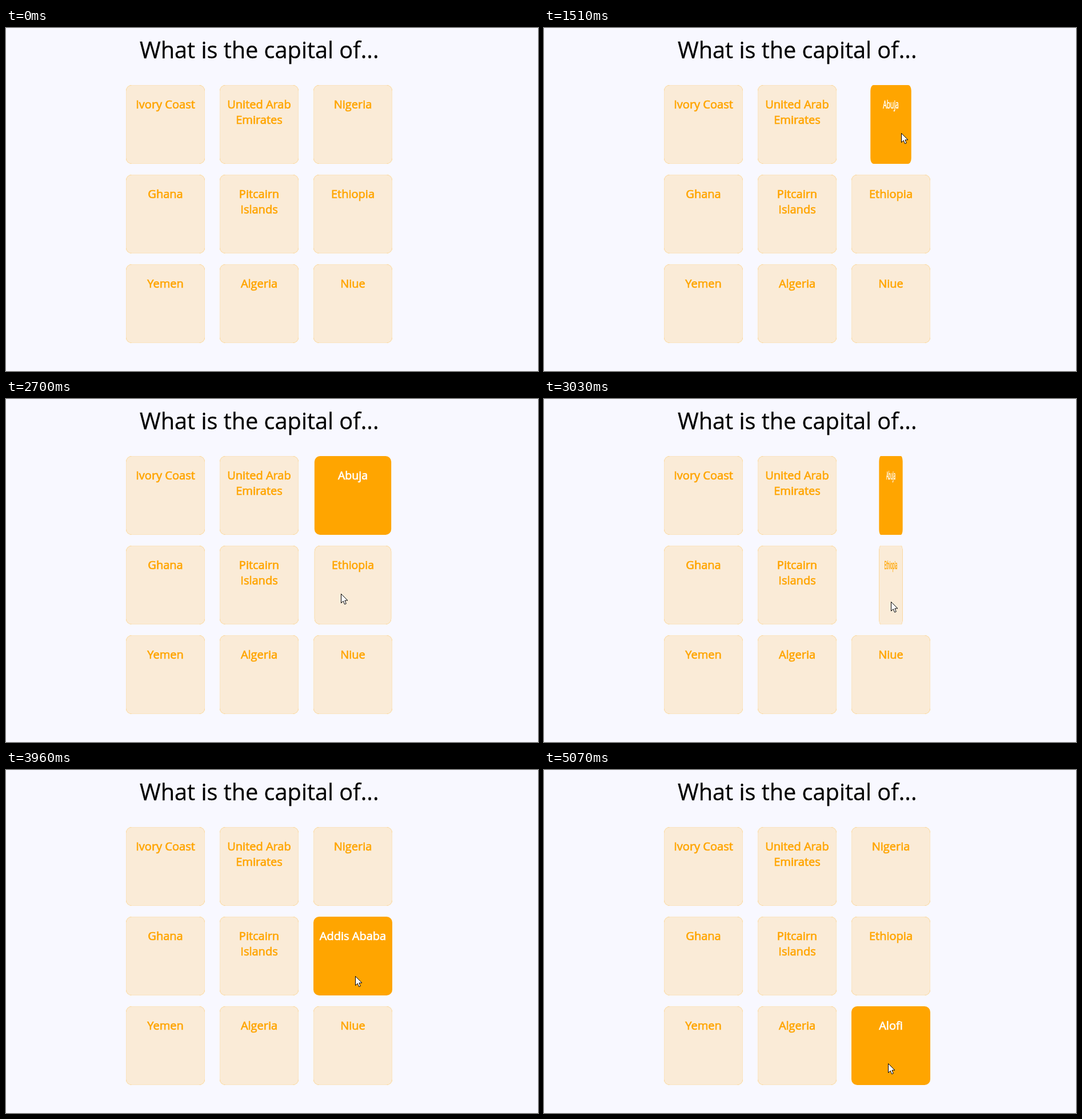
An HTML page for the animation above (5740 ms loop, 931 by 601 pixels).

```html
<!DOCTYPE html>
<html lang="en">
<head>
<meta charset="utf-8">
<title>Capital quiz cards</title>
<style>
  html, body { margin: 0; width: 100%; height: 100%; overflow: hidden; background: #f8f8ff; }
  svg { display: block; }
  text { font-family: "Open Sans", sans-serif; text-anchor: middle; }
  .title { font-size: 39.7px; stroke: #000; stroke-width: .3px; }
  .label { font-size: 20px; stroke-width: .7px; }
  .front .label { fill: #ffa500; stroke: #ffa500; }
  .back .label { fill: #fff; stroke: #fff; }
  .base { fill: #ffa500; }
  .paper { fill: #faebd7; }
  .rim { fill: none; stroke: #ffa500; stroke-opacity: .1; }
</style>
</head>
<body>
<svg id="stage" width="931" height="601" viewBox="0 0 931 601">
  <text class="title" x="443.2" y="52.5">What is the capital of...</text>
  <g id="cards"></g>
  <path id="cursor" d="M.5 .5V16.5L4.2 13 6.6 18.7 9.3 17.6 6.9 12H11.9Z"
        fill="#fff" stroke="#000" stroke-width="1" visibility="hidden"/>
</svg>
<script>
const LOOP = 5740, FIRST = 590, STEP = 65.95, FLIP = 1000;
const SIZE = 138, RADIUS = 10;

// question lines, answer, time turned over, time turned back
const deck = [
  ["Ivory Coast"], ["United Arab|Emirates"], ["Nigeria", "Abuja", 840, 2627],
  ["Ghana"], ["Pitcairn|Islands"], ["Ethiopia", "Addis Ababa", 2627, 4025],
  ["Yemen"], ["Algeria"], ["Niue", "Alofi", 4025, Infinity]
];

// time, x, y of the pointer tip
const path = [
  [590, 870, 161], [656, 811, 162], [722, 703, 165], [788, 642, 176], [854, 625, 184],
  [2371, 625, 184], [2437, 616, 208], [2503, 600, 266], [2569, 589, 318],
  [2634, 586, 341], [2701, 586, 341], [3030, 607, 355], [3162, 610, 359],
  [3888, 610, 359], [3953, 611, 360], [4019, 604, 478], [4085, 602, 514]
];

const make = (parent, tag, attrs, content) => {
  const el = document.createElementNS("http://www.w3.org/2000/svg", tag);
  for (const key in attrs) el.setAttribute(key, attrs[key]);
  if (content) el.textContent = content;
  return parent.appendChild(el);
};

const box = (parent, cls, inset = 0) => make(parent, "rect", {
  class: cls, x: inset - SIZE / 2, y: inset,
  width: SIZE - 2 * inset, height: SIZE - 2 * inset, rx: RADIUS - inset
});

const label = (parent, lines) => lines.split("|").forEach((line, i) =>
  make(parent, "text", { class: "label", x: 0, y: 41 + 27 * i }, line));

const cards = deck.map(([ask, answer, open, close], i) => {
  const x = 279 + 164 * (i % 3), y = 100 + 157 * Math.floor(i / 3);
  const el = make(document.getElementById("cards"), "g", { transform: `translate(${x} ${y})` });
  box(el, "base");
  const front = make(el, "g", { class: "front" });
  box(front, "paper");
  box(front, "rim", .5);
  label(front, ask);
  const back = make(el, "g", { class: "back", visibility: "hidden" });
  if (answer) label(back, answer);
  return { el, front, back, x, y, open, close };
}).filter(card => card.open);

const cursor = document.getElementById("cursor");
const clamp = v => Math.min(1, Math.max(0, v));
const show = (el, on) => el.setAttribute("visibility", on ? "visible" : "hidden");

function turn(card, t) {
  const p = clamp((t - card.open) / FLIP) - clamp((t - card.close) / FLIP);
  const c = Math.cos(Math.PI * p);
  card.el.setAttribute("transform",
    `translate(${card.x} ${card.y}) scale(${Math.max(Math.abs(c), .001)} 1)`);
  show(card.front, c >= 0);
  show(card.back, c < 0);
}

function point(t) {
  show(cursor, t >= FIRST);
  const next = path.findIndex(key => key[0] > t);
  const b = next < 0 ? path[path.length - 1] : path[next];
  const a = next < 0 ? b : path[Math.max(0, next - 1)];
  const k = a === b ? 0 : (t - a[0]) / (b[0] - a[0]);
  const at = i => Math.round(a[i] + (b[i] - a[i]) * k);
  cursor.setAttribute("transform", `translate(${at(1)} ${at(2)})`);
}

function hold(t) {
  const n = Math.floor((t - FIRST + 5) / STEP);
  return n < 0 ? 0 : FIRST + n * STEP;
}

function draw() {
  const t = hold(performance.now() % LOOP);
  cards.forEach(card => turn(card, t));
  point(t);
  requestAnimationFrame(draw);
}
draw();
</script>
</body>
</html>
```
